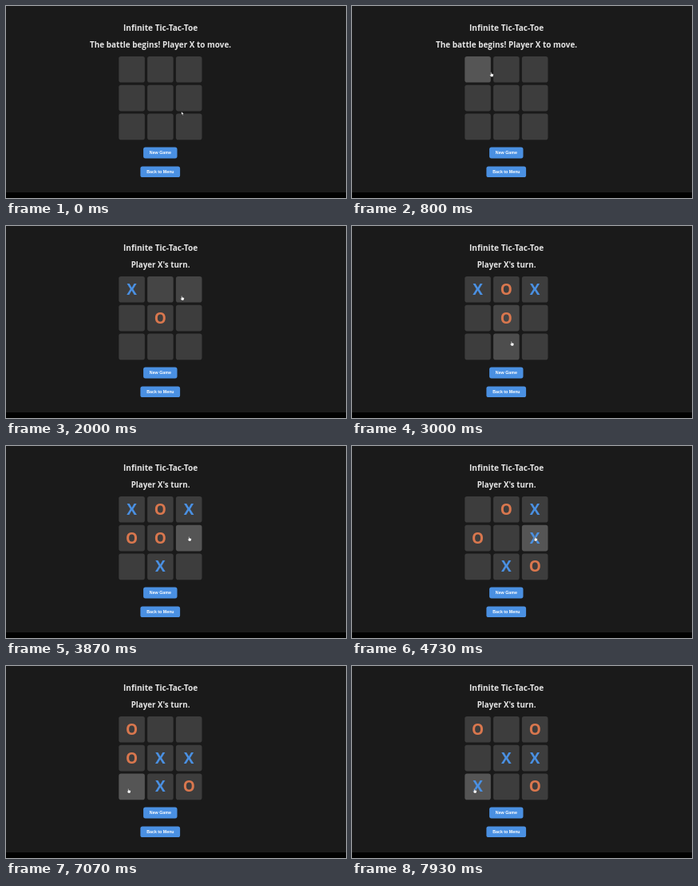
An HTML page that plays this animation: 426 by 240 pixels, repeating every 8 s.

```html
<!DOCTYPE html>
<html lang="en">
<head>
<meta charset="utf-8">
<title>Infinite Tic-Tac-Toe</title>
<style>
  html, body { margin: 0; width: 100%; height: 100%; overflow: hidden; background: #1a1a1a; }
  svg { display: block; width: 100vw; height: 100vh; }
  text { text-anchor: middle; font-family: "Open Sans", "Noto Sans", sans-serif; font-weight: 700; fill: #e6e6e6; }
  .mark { font-size: 19px; }
  .X { fill: #4a90e2; }
  .O { fill: #d9774e; }
  .button rect { fill: #4a90e2; }
  .button text { font: 700 5.3px "Liberation Sans", Arial, sans-serif; fill: #fff; }
</style>
</head>
<body>
<svg id="stage" viewBox="0 0 426 240">
  <rect width="426" height="240" fill="#1a1a1a"/>
  <rect y="233" width="426" height="7" fill="#000"/>
  <text x="193.6" y="30.6" font-size="10.1">Infinite Tic-Tac-Toe</text>
  <text id="status" x="193.6" y="51.6"></text>
  <g id="board"></g>
  <g class="button">
    <rect x="172.1" y="176.6" width="42.4" height="13.8" rx="2.6"/>
    <text x="193.4" y="185.4">New Game</text>
  </g>
  <g class="button">
    <rect x="168.4" y="200.5" width="49.7" height="13.6" rx="2.6"/>
    <text x="193.4" y="209.1">Back to Menu</text>
  </g>
  <g id="cursor" fill="#fff" stroke="#222" stroke-width=".4">
    <path id="hand" d="M0 0q.6-.6 1.1 0v1.6l2 .5q.7.3.6 1l-.4 1.5-.5.9H.5L-1.2 3.3q0-.8.8-.5l.4.4z"/>
    <path id="arrow" d="M0 0v4.2l1-.8.7 1.5.8-.4-.7-1.4h1.3z"/>
  </g>
</svg>
<script>
const LOOP = 8000, STEP = LOOP / 120, FADE_STEPS = 3;
const TRAVEL = 500, PAUSE = 400, REPLY = 400;
const LEFT = 141.3, TOP = 63, PITCH = 35.8, SIZE = 32.6;
const $ = id => document.getElementById(id);

const start = [219.8, 131.9];
// X clicks at a spot on the board, O answers in a cell
const turns = [
  { click: 1000, spot: [173.6, 83], answer: 4 },
  { click: 2500, spot: [225, 88], answer: 1 },
  { click: 3450, spot: [198.5, 146], answer: 3 },
  { click: 4250, spot: [228.7, 113.5], answer: 8 },
  { click: 6450, spot: [189.7, 107.5], answer: 0 },
  { click: 7400, spot: [152.7, 153.5], answer: 2 }
];

function cellAt([x, y]) {
  const dx = x - LEFT, dy = y - TOP;
  const inside = dx % PITCH < SIZE && dy % PITCH < SIZE;
  return inside ? Math.floor(dy / PITCH) * 3 + Math.floor(dx / PITCH) : -1;
}

const moves = turns.flatMap(({ click, spot, answer }) => [
  { time: click, player: "X", cell: cellAt(spot) },
  { time: click + REPLY, player: "O", cell: answer }
]);

function add(tag, attrs) {
  const node = document.createElementNS("http://www.w3.org/2000/svg", tag);
  for (const key in attrs) node.setAttribute(key, attrs[key]);
  return $("board").appendChild(node);
}

const cells = Array.from({ length: 9 }, (_, i) => {
  const x = LEFT + (i % 3) * PITCH, y = TOP + Math.floor(i / 3) * PITCH;
  return {
    box: add("rect", { x, y, width: SIZE, height: SIZE, rx: 2.8 }),
    mark: add("text", { x: x + SIZE / 2, y: y + 22.7 })
  };
});

const clamp = v => Math.max(0, Math.min(1, v));
const smooth = v => v * v * (3 - 2 * v);

// Each turn eases the pointer to its spot and rests there before the click
function pointerAt(t) {
  return turns.reduce((from, { click, spot }) => {
    const k = smooth(clamp((t - click + PAUSE + TRAVEL) / TRAVEL));
    return from.map((v, axis) => v + (spot[axis] - v) * k);
  }, start);
}

function render(t) {
  const played = moves.filter(m => m.time <= t);
  // Only the three newest marks of each player stay on the board
  const live = ["X", "O"].flatMap(who => played.filter(m => m.player === who).slice(-3));
  // The hover glow is the average over the last few steps
  const recent = Array.from({ length: FADE_STEPS }, (_, i) => cellAt(pointerAt(t - i * STEP)));

  cells.forEach(({ box, mark }, i) => {
    const glow = recent.filter(cell => cell === i).length / FADE_STEPS;
    const shade = Math.round(61 + 24 * glow);
    box.setAttribute("fill", `rgb(${shade},${shade},${shade})`);
    const player = live.find(m => m.cell === i)?.player ?? "";
    mark.textContent = player;
    mark.setAttribute("class", `mark ${player}`);
  });

  const next = played.length % 2 ? "O" : "X";
  $("status").textContent = played.length
    ? `Player ${next}'s turn.` : "The battle begins! Player X to move.";
  $("status").setAttribute("font-size", played.length ? 9.75 : 9.95);

  const hovering = recent[0] >= 0;
  $("hand").style.display = hovering ? "" : "none";
  $("arrow").style.display = hovering ? "none" : "";
  $("cursor").setAttribute("transform", `translate(${pointerAt(t)})`);
}

function tick() {
  const t = performance.now() % LOOP;
  render(Math.floor(t / STEP) * STEP);
  requestAnimationFrame(tick);
}
tick();
</script>
</body>
</html>
```
